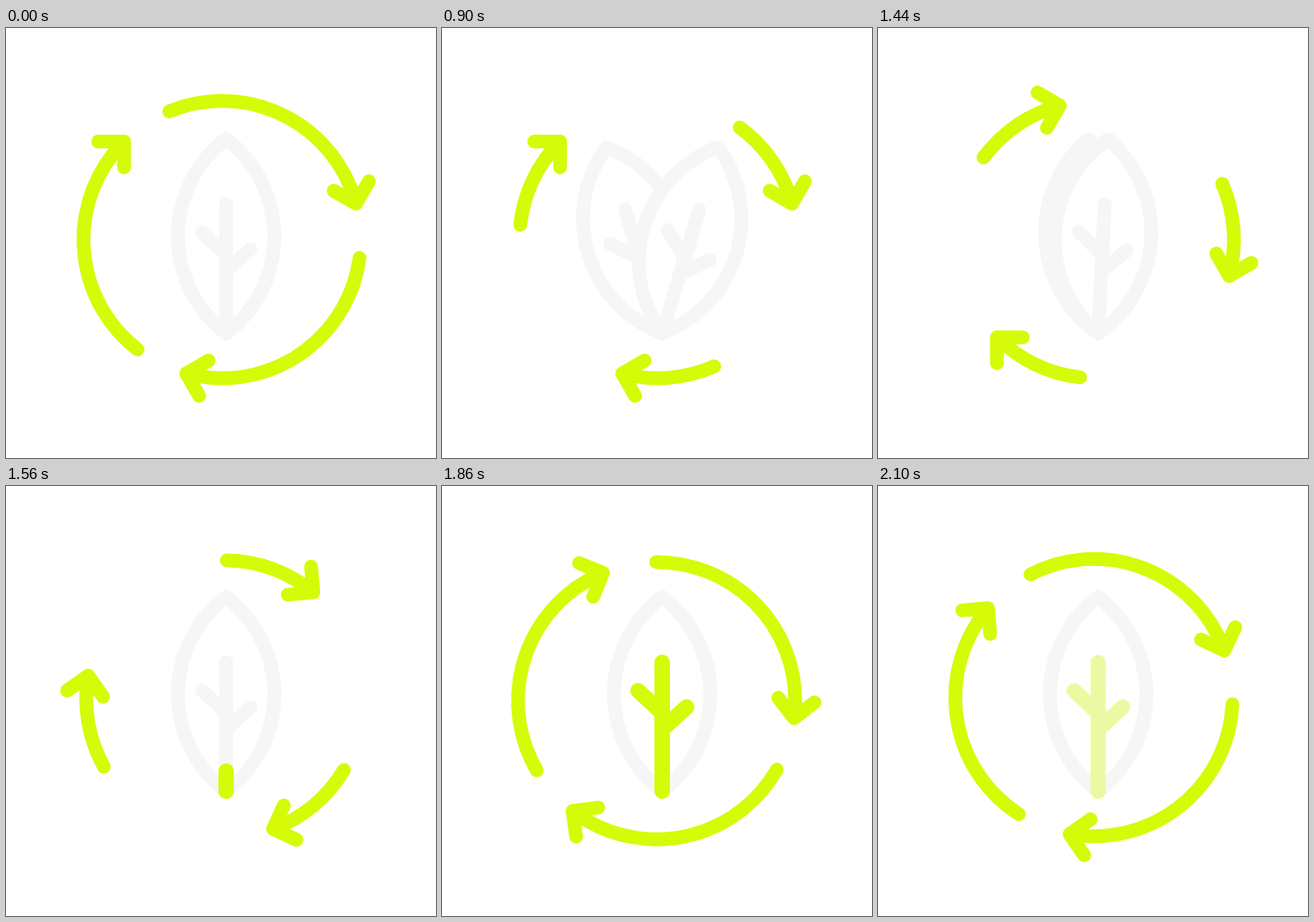
Recreate the animation shown at these times as an HTML page with a canvas. Size 500 by 500 pixels, loop 2.16 s.

```html
<!DOCTYPE html>
<html lang="en">
<head>
<meta charset="utf-8">
<title>Leaf cycle</title>
<style>
  html, body { margin: 0; width: 100%; height: 100%; overflow: hidden; background: #fff; }
  canvas { display: block; width: 100vw; height: 100vh; }
</style>
</head>
<body>
<canvas id="stage" width="500" height="500"></canvas>
<script>
const ctx = document.getElementById('stage').getContext('2d');
const LOOP = 2160, STEP = 60;
const LIME = '#d5fb08', GREY = '#f6f6f6', WHITE = '#fff';
const RAD = Math.PI / 180;

const pivot = { x: 252, y: 248.6 };
const ring = { x: -0.7, y: -2.6, r: 161.2 };   // relative to the pivot
const LONG = 97.4, SHORT = 38.9, WING = 30;
const base = { x: 256, y: 355 };
const LEAF_H = 226, LEAF_R = 142, REST = 16.7;

// eased progress of t between a and b
function ease(t, a, b) {
  const s = Math.min(1, Math.max(0, (t - a) / (b - a)));
  return s * s * (3 - 2 * s);
}

const mix = (a, b, k) => a + (b - a) * k;

function arrow(head, sweep) {
  const a = head * RAD;
  const x = ring.x + ring.r * Math.cos(a);
  const y = ring.y + ring.r * Math.sin(a);
  const wing = turn => {
    const w = (head - 90 + turn) * RAD;
    return [x + WING * Math.cos(w), y + WING * Math.sin(w)];
  };
  ctx.beginPath();
  ctx.arc(ring.x, ring.y, ring.r, (head - sweep) * RAD, a);
  ctx.moveTo(...wing(-45));
  ctx.lineTo(x, y);
  ctx.lineTo(...wing(45));
  ctx.stroke();
}

function arrows(t) {
  const grow = ease(t, 1560, 1850);
  const sweep = (a, b) => mix(LONG, SHORT, ease(t, a, b) - grow);
  ctx.save();
  ctx.translate(pivot.x, pivot.y);
  ctx.rotate(360 * RAD * ease(t, 1284, LOOP));
  ctx.strokeStyle = LIME;
  ctx.lineWidth = 16;
  arrow(-15, sweep(160, 880));
  arrow(105, sweep(0, 706));
  arrow(225, sweep(0, 706));
  ctx.restore();
}

// stem and twigs, each drawn up to its share of the full length
function veins(stem, twigs) {
  ctx.beginPath();
  ctx.moveTo(0, 0);
  ctx.lineTo(0, -150 * stem);
  if (twigs > 0) {
    ctx.moveTo(0, -91);
    ctx.lineTo(-28 * twigs, -91 - 26 * twigs);
    ctx.moveTo(0, -72);
    ctx.lineTo(28.5 * twigs, -72 - 26 * twigs);
  }
  ctx.stroke();
}

function leaf(angle) {
  const half = Math.asin(LEAF_H / 2 / LEAF_R);
  const off = LEAF_R * Math.cos(half);
  ctx.save();
  ctx.translate(base.x, base.y);
  ctx.rotate(angle * RAD);
  ctx.fillStyle = WHITE;
  ctx.strokeStyle = GREY;
  ctx.lineWidth = 16;
  ctx.beginPath();
  ctx.arc(-off, -LEAF_H / 2, LEAF_R, -half, half);
  ctx.arc(off, -LEAF_H / 2, LEAF_R, Math.PI - half, Math.PI + half);
  ctx.closePath();
  ctx.fill();
  ctx.stroke();
  veins(1, 1);
  ctx.restore();
}

function leaves(t) {
  const spread = peak =>
    mix(peak * ease(t, 0, 420), REST, ease(t, 420, 720)) * (1 - ease(t, 1275, 1500));
  leaf(-spread(22.7));
  leaf(spread(24));
}

function sprout(t) {
  const stem = ease(t, 1500, 1740);
  if (!stem) return;
  ctx.save();
  ctx.translate(base.x, base.y);
  ctx.globalAlpha = 1 - ease(t, 2010, 2160);
  ctx.strokeStyle = LIME;
  ctx.lineWidth = 18;
  veins(stem, ease(t, 1640, 1820));
  ctx.restore();
}

function draw(t) {
  ctx.fillStyle = WHITE;
  ctx.fillRect(0, 0, 500, 500);
  ctx.lineCap = ctx.lineJoin = 'round';
  leaves(t);
  sprout(t);
  arrows(t);
}

const start = performance.now();
function tick() {
  const t = (performance.now() - start) % LOOP;
  draw(Math.floor(t / STEP) * STEP);
  requestAnimationFrame(tick);
}
tick();
</script>
</body>
</html>
```
